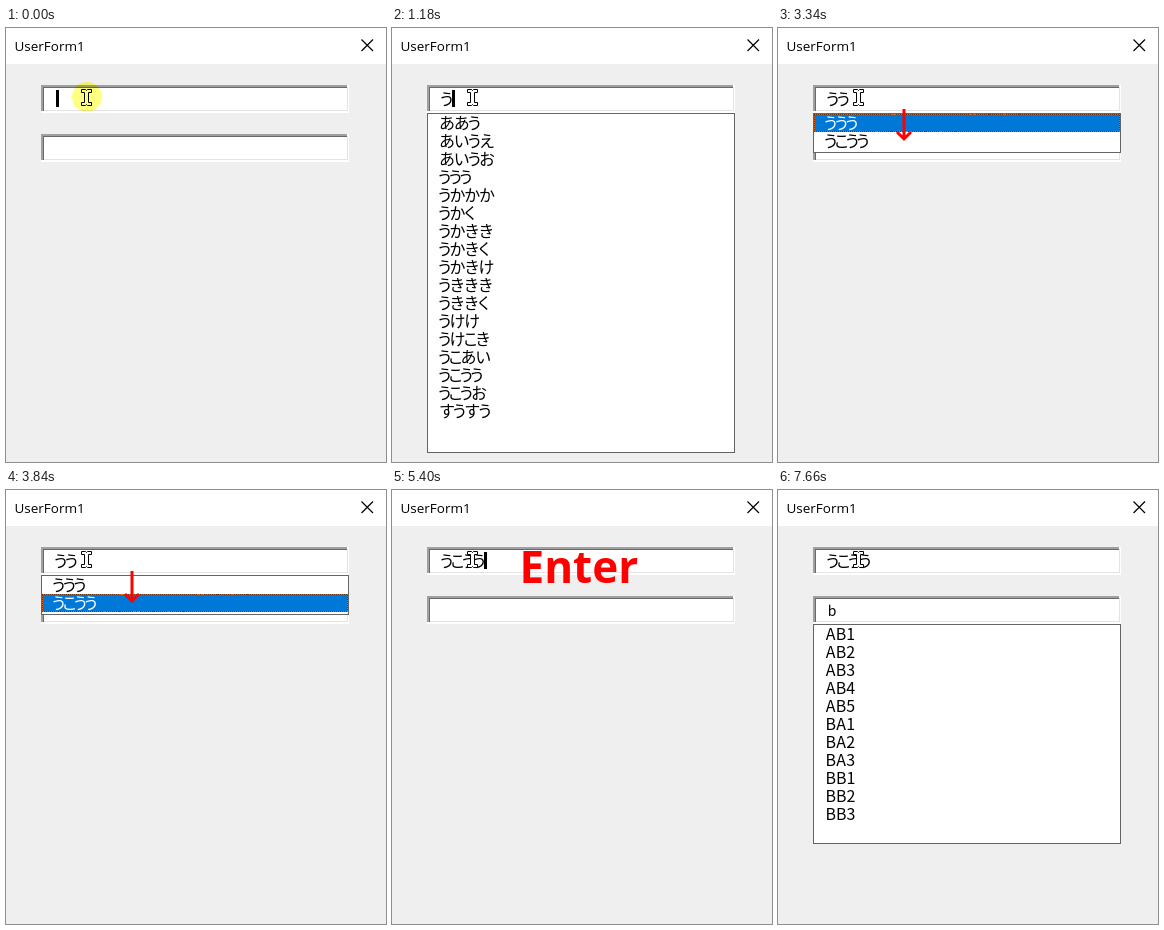
Animation of 380x434 px, one loop 8 s. Source, as an HTML page:

```html
<!DOCTYPE html>
<html lang="ja">
<head>
<meta charset="utf-8">
<title>UserForm1</title>
<style>
html, body { margin: 0; width: 100%; height: 100%; overflow: hidden; background: #efefef; }
svg { display: block; width: 380px; height: 434px; }
.kana { font: 300 16px "Noto Sans CJK JP", "Noto Sans CJK", sans-serif; text-anchor: middle; }
.title { font: 13.5px "Open Sans", "Noto Sans", sans-serif; }
.key { font: 700 44px "Open Sans", "Noto Sans", sans-serif; fill: #f00; }
.glow { mix-blend-mode: multiply; }
rect { shape-rendering: crispEdges; }
</style>
</head>
<body>
<svg id="stage" viewBox="0 0 380 434"></svg>
<script>
const LOOP = 8000;
const stage = document.getElementById('stage');
const ADVANCE = { う: 10.6, こ: 11, く: 10.8, き: 14.3, A: 10.3, B: 10.5, b: 9 };
const advance = c => ADVANCE[c] || (c < '~' ? 9 : 14.8);

function add(tag, attrs, parent = stage) {
  const el = document.createElementNS('http://www.w3.org/2000/svg', tag);
  for (const k in attrs) el.setAttribute(k, attrs[k]);
  parent.append(el);
  return el;
}

const box = (x, y, width, height, fill, parent) =>
  add('rect', { x, y, width, height, fill }, parent);

// Proportional kana: each glyph is centred in its own advance.
function write(str, x, y, parent, fill = '#000', size = 16) {
  const xs = [...str].map(c => {
    const w = advance(c);
    x += w;
    return (x - w / 2).toFixed(1);
  });
  const el = add('text', { x: xs.join(' '), y, fill, class: 'kana', style: `font-size:${size}px` }, parent);
  el.textContent = str;
  return el;
}

// Visible only inside the given [from, to] spans.
function show(el, ...spans) {
  const steps = [];
  if (spans[0][0] > 0) steps.push([0, 0]);
  for (const [from, to] of spans) {
    steps.push([from, 1]);
    if (to < LOOP) steps.push([to, 0]);
  }
  const last = steps[steps.length - 1][1];
  steps.push([LOOP, last]);
  el.animate(
    steps.map(([t, opacity]) => ({ offset: t / LOOP, opacity, easing: 'steps(1, end)' })),
    { duration: LOOP, iterations: Infinity });
}

function field(y) {
  box(35, y, 308, 28, '#fff');
  box(35, y, 306, 2, '#a0a0a0');
  box(35, y, 2, 26, '#a0a0a0');
  box(37, y + 2, 304, 1, '#696969');
  box(37, y + 2, 1, 24, '#696969');
  box(38, y + 25, 304, 1, '#e3e3e3');
  box(341, y + 2, 1, 24, '#e3e3e3');
}

function list(y, height, rows) {
  const g = add('g', {});
  box(35, y, 308, height, '#646464', g);
  box(36, y + 1, 306, height - 2, '#fff', g);
  rows.forEach((row, i) => write(row, 47.5, y + 16 + 18 * i, g));
  return g;
}

function selection(y, str) {
  const g = add('g', {});
  box(36, y, 306, 18, '#0078d7', g);
  const edge = { x: 36.5, y: y + .5, width: 305, height: 17, fill: 'none' };
  add('rect', { ...edge, stroke: '#643214' }, g);
  add('rect', { ...edge, stroke: '#d9661a', 'stroke-dasharray': '1 1' }, g);
  write(str, 47.5, y + 15, g, '#fff');
  return g;
}

const caret = (x, y, ...spans) => show(box(x, y, 3, 17, '#000'), ...spans);

// Window
box(0, 0, 380, 434, '#efefef');
box(0, 0, 380, 36, '#fff');
add('text', { x: 8.5, y: 22.5, class: 'title' }).textContent = 'UserForm1';
add('path', { d: 'M355.5 11.5L367 23M367 11.5L355.5 23', stroke: '#000', 'stroke-width': 1.2 });
field(57);
field(106);

// Typed text and carets
show(write('う', 49.5, 77), [930, 2050]);
show(write('うう', 49.5, 77), [2050, 5400]);
show(write('うこうう', 49.5, 77), [5400, LOOP]);
show(write('b', 49.5, 126, stage, '#000', 14), [6910, LOOP]);
caret(50, 62, [0, 500]);
caret(60, 62, [930, 1560], [1690, 2050]);
caret(70, 62, [2050, 2670], [2980, 3340]);
caret(92, 62, [5400, 5930]);
caret(50, 111, [6660, 6910]);
caret(58, 111, [6910, 7660]);

// Suggestions
const words = 'ああう あいうえ あいうお ううう うかかか うかく うかきき うかきく うかきけ ' +
  'うききき うききく うけけ うけこき うこあい うこうう うこうお すうすう';
show(list(85, 340, words.split(' ')), [1050, 2110]);
show(list(85, 40, ['ううう', 'うこうう']), [2110, 5400]);
show(selection(86, 'ううう'), [3340, 3840]);
show(selection(104, 'うこうう'), [3840, 5400]);
show(list(134, 220, 'AB1 AB2 AB3 AB4 AB5 BA1 BA2 BA3 BB1 BB2 BB3'.split(' ')), [7000, LOOP]);

// Pointer and key hints
add('path', {
  d: 'M75.5 61.5H79.5L80.5 62.5L81.5 61.5H85.5V64.5H82.5V74.5H85.5V77.5H81.5L80.5 76.5L79.5 77.5H75.5V74.5H78.5V64.5H75.5Z',
  fill: '#fff', stroke: '#000'
});
show(add('circle', { cx: 81, cy: 69, r: 15, fill: '#ffff80', class: 'glow' }), [0, 130]);
show(add('path', {
  d: 'M126 81V111M119 104L126 111L133 104', fill: 'none', stroke: '#f00', 'stroke-width': 3
}), [3160, 4900]);
const key = add('text', { x: 127.5, y: 92.5, class: 'key' });
key.textContent = 'Enter';
show(key, [5080, 5730]);
</script>
</body>
</html>
```
